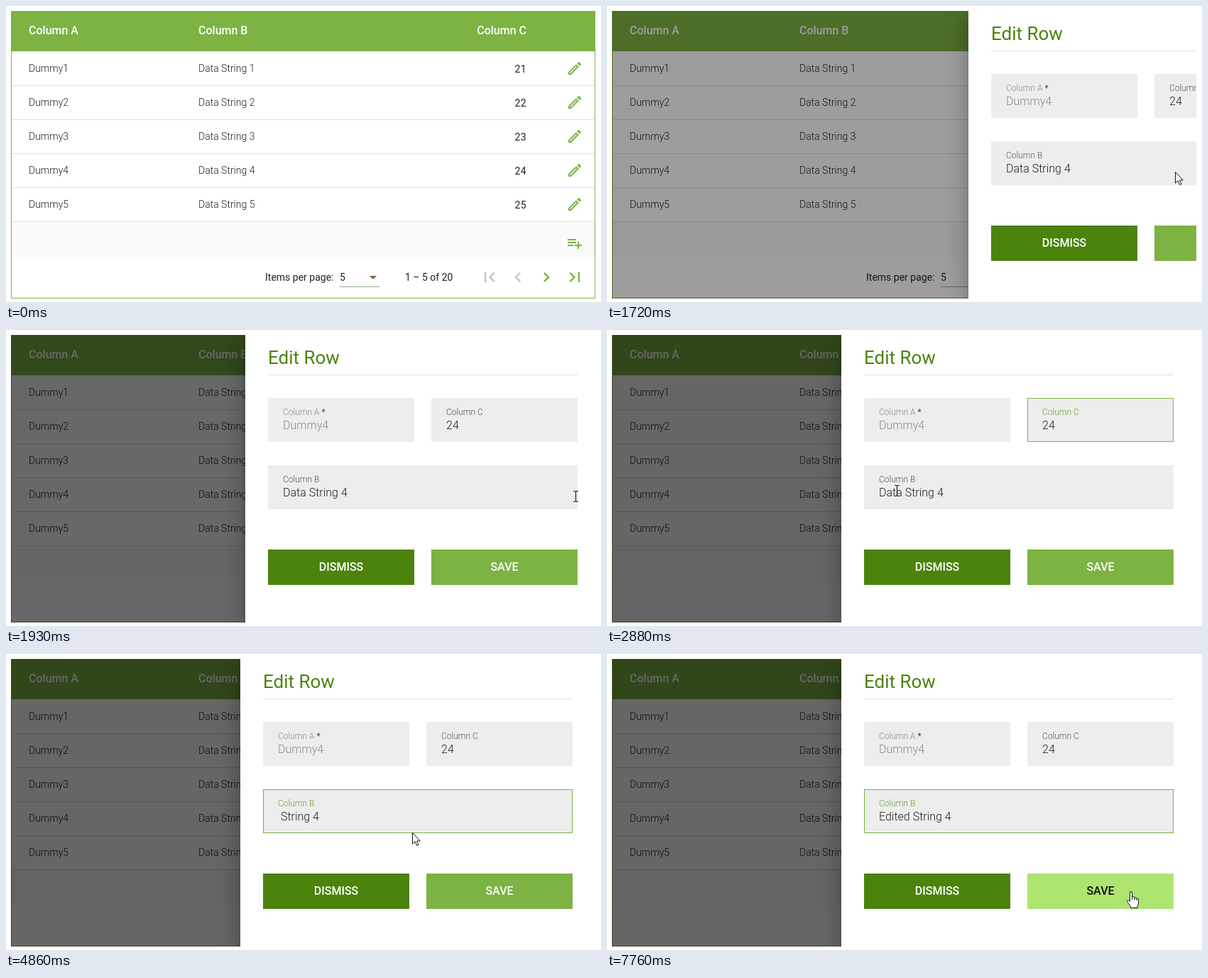
An HTML page that plays this animation: 838x418 px, repeating every 8000 ms.

```html
<!DOCTYPE html>
<html lang="en">
<head>
<meta charset="utf-8">
<title>Edit a table row</title>
<style>
html, body { margin: 0; width: 100%; height: 100%; overflow: hidden; background: #fff; }
body { position: relative; font: 300 14px/20px Roboto, sans-serif; color: rgba(0,0,0,.87); }
div, svg { position: absolute; box-sizing: border-box; }
.t { white-space: pre; height: 20px; }
#app { left: 7px; top: 7px; width: 823px; height: 406px; overflow: hidden; }
#view { left: -7px; top: -7px; width: 838px; height: 418px; }
.frame { left: 7px; top: 7px; width: 823px; height: 406px; border: 1px solid #7cb342; }
.head { left: 7px; top: 7px; width: 823px; height: 57px; background: #7cb342; }
.line { height: 1px; background: #e0e0e0; }
.h { color: #fff; font-weight: 500; font-size: 16px; }
.num { font-weight: 400; letter-spacing: .4px; }
.reg { font-weight: 400; }
#dim { inset: 0; background: #000; }
#panel { left: 0; top: 7px; width: 500px; height: 406px; background: #fff;
  box-shadow: 0 8px 10px -5px rgba(0,0,0,.2), 0 16px 24px 2px rgba(0,0,0,.14), 0 6px 30px 5px rgba(0,0,0,.12); }
.title { font-size: 26px; font-weight: 400; color: #4b830d; }
.field { height: 62px; background: #eceded; border: 1px solid transparent; }
.label { font-size: 12px; left: 20px; top: 9px; color: rgba(0,0,0,.65); }
.value { font-size: 16px; left: 20px; top: 28px; }
.off .label, .off .value { color: rgba(0,0,0,.42); }
.off b { font-weight: 400; color: rgba(0,0,0,.7); }
.focus { border-color: #7cb342; }
.focus .label { color: #689f38; }
.caret { position: relative; display: inline-block; width: 0; }
.caret::after { content: ""; position: absolute; left: 0; top: -15px; width: 1px; height: 18px; background: #111; }
.btn { top: 303px; width: 206px; height: 50px; font: 500 16px/49px Roboto, sans-serif; text-align: center; color: #fff; }
#tip { left: 712px; top: 219px; width: 55px; height: 27px; background: #717171; color: #fff;
  font: 500 9.6px/27px Inter, sans-serif; text-align: center; white-space: nowrap; }
#ripple { left: 782px; top: 216px; width: 37px; height: 37px; border-radius: 50%; background: rgba(0,0,0,.105); }
#mouse { left: 0; top: 0; width: 1px; height: 1px; }
#mouse svg { overflow: visible; left: 0; top: 0; }
</style>
</head>
<body>
<div id="app"><div id="view"></div></div>
<div id="mouse">
  <svg id="arrow" width="1" height="1"><path d="M.5 .5V16.2L4.2 12.8 6.7 18.5 9 17.5 6.6 12H11.4Z" fill="#fff" stroke="#111"/></svg>
  <svg id="beam" width="1" height="1"><path d="M-3 -7.5H-1L.5 -6.5 2 -7.5H4M.5 -6.5V6.5M-3 7.5H-1L.5 6.5 2 7.5H4" fill="none" stroke="#222" stroke-width="1.2"/></svg>
  <svg id="hand" width="1" height="1"><path d="M-1.5 12V2Q-1.5 .5 0 .5T1.6 2V8Q4.4 6.8 5 9Q7.4 8 8 10.2Q10.5 9.6 10.5 12V17Q10.5 19 9 21V23.5H-.5V21.5L-4.8 15.5Q-6.5 13 -4.6 12.4Q-3.4 12 -1.5 14.5Z" fill="#fff" stroke="#111"/><path d="M1.6 8V12M5 9V12.5M8 10.2V13" stroke="#111"/></svg>
</div>
<script>
const $ = id => document.getElementById(id);
const LOOP = 8000;
const GREEN = '#7cb342';

const box = (cls, x, y, w, h, extra = '') =>
  `<div class="${cls}" style="left:${x}px;top:${y}px;width:${w}px;height:${h}px;${extra}"></div>`;
const text = (x, mid, str, cls = '') =>
  `<div class="t ${cls}" style="left:${x}px;top:${mid - 10}px">${str}</div>`;
const textEnd = (right, mid, str, cls = '') =>
  `<div class="t ${cls}" style="right:${838 - right}px;top:${mid - 10}px">${str}</div>`;
const icon = (cx, cy, size, d, fill = GREEN) =>
  `<svg style="left:${cx - size / 2}px;top:${cy - size / 2}px" width="${size}" height="${size}" viewBox="0 0 24 24"><path fill="${fill}" d="${d}"/></svg>`;

const PENCIL = 'M14.06 9.02l.92.92L5.92 19H5v-.92l9.06-9.06M17.66 3c-.25 0-.51.1-.7.29l-1.83 1.83 3.75 3.75 1.83-1.83c.39-.39.39-1.02 0-1.41l-2.34-2.34c-.2-.2-.45-.29-.71-.29zm-3.6 3.19L3 17.25V21h3.75L17.81 9.94l-3.75-3.75z';
const ADD = 'M14 10H2v2h12v-2zm0-4H2v2h12V6zm4 8v-4h-2v4h-4v2h4v4h2v-4h4v-2h-4zM2 16h8v-2H2v2z';
const PAGES = [
  'M18.41 16.59L13.82 12l4.59-4.59L17 6l-6 6 6 6zM6 6h2v12H6z',
  'M15.41 7.41L14 6l-6 6 6 6 1.41-1.41L10.83 12z',
  'M10 6L8.59 7.41 13.17 12l-4.58 4.59L10 18l6-6z',
  'M5.59 7.41L10.18 12l-4.59 4.59L7 18l6-6-6-6zM16 6h2v12h-2z'
];

function table() {
  let s = box('', 8, 305, 821, 50, 'background:#fafafa') + '<div class="frame"></div><div class="head"></div>' +
    text(32, 35, 'Column A', 'h') + text(271, 35, 'Column B', 'h') + textEnd(733, 35, 'Column C', 'h');
  for (let i = 1; i <= 5; i++) {
    const y = 40 + 48 * i;
    s += text(32, y, 'Dummy' + i) + text(271, y, 'Data String ' + i) + textEnd(733, y + 1, 20 + i, 'num') +
      icon(801, y, 24, PENCIL) + box('line', 8, y + 24, 821, 1);
  }
  s += icon(801, 335, 24, ADD) + text(365, 383, 'Items per page:', 'reg') + text(470, 383, '5', 'reg') +
    box('', 470, 396, 56, 1, 'background:#8fae8c') +
    '<svg style="left:512px;top:381px" width="10" height="5"><path d="M0 0H10L5 5Z" fill="#7b6a35"/></svg>' +
    text(562, 383, '1 – 5 of 20', 'reg');
  PAGES.forEach((d, i) => s += icon(681 + 40 * i, 383, 28, d, i < 2 ? '#bccbb9' : GREEN));
  return s;
}

const field = (id, x, y, w, label, value, cls = '') =>
  `<div id="${id}" class="field ${cls}" style="left:${x}px;top:${y}px;width:${w}px">
  <div class="t label">${label}</div><div class="t value">${value}</div></div>`;

const form = text(32, 32, 'Edit Row', 'title') + box('line', 32, 56, 436, 1) +
  field('fa', 32, 89, 206, 'Column A <b>*</b>', 'Dummy4', 'off') +
  field('fc', 262, 89, 206, 'Column C', '<span class="caret" id="caretC"></span>24') +
  field('fb', 32, 184, 436, 'Column B', '<span id="pre"></span><span class="caret" id="caretB"></span><span id="post"></span>') +
  '<div class="btn" style="left:32px;background:#4b830d">DISMISS</div>' +
  '<div class="btn" id="save" style="left:262px">SAVE</div>';

$('view').innerHTML = table() +
  '<div id="tip">Edit Row</div><div id="ripple"></div><div id="dim"></div>' +
  `<div id="panel">${form}</div>`;

// time, x, y of the pointer
const PATH = [
  [120, 838, 240], [300, 800, 234], [2240, 800, 234], [2320, 785, 241], [2480, 700, 238],
  [2880, 408, 227], [3040, 387, 229], [3090, 387, 229], [3330, 382, 231],
  [3500, 572, 252], [6890, 572, 252], [7260, 738, 335]
];
const SHAPES = [[0, 'none'], [120, 'arrow'], [1770, 'beam'], [1985, 'arrow'], [2340, 'beam'], [3480, 'arrow'], [7140, 'hand']];
// text before and after the caret in Column B
const EDITS = [
  [0, '', 'Data String 4'], [4130, '', 'ata String 4'], [4210, '', 'ta String 4'], [4290, '', 'a String 4'],
  [4780, '', ' String 4'], [5340, 'E', ' String 4'], [5590, 'Ed', ' String 4'], [5670, 'Edi', ' String 4'],
  [5920, 'Edit', ' String 4'], [6000, 'Edite', ' String 4'], [6170, 'Edited', ' String 4']
];
const BLINK_B = [[0, 0], [3330, 1], [3830, 0], [4370, 1], [4860, 0], [5340, 1], [6670, 0], [7260, 1], [7760, 0]];
const BLINK_C = [[0, 0], [2040, 1], [2540, 0], [3040, 1], [3330, 0]];
const FOCUS = [[0, ''], [2040, 'fc'], [3330, 'fb']];

const step = (rows, t) => rows.filter(r => r[0] <= t).pop();
const clamp = v => Math.max(0, Math.min(1, v));
const show = (id, on) => $(id).style.visibility = on ? 'visible' : 'hidden';

function pointer(t) {
  let i = PATH.findIndex(p => p[0] > t);
  if (i === 0) return PATH[0].slice(1);
  if (i < 0) return PATH[PATH.length - 1].slice(1);
  const [a, b] = [PATH[i - 1], PATH[i]], k = (t - a[0]) / (b[0] - a[0]);
  return [1, 2].map(n => Math.round(a[n] + (b[n] - a[n]) * k));
}

// cubic-bezier(.25, .8, .25, 1)
function ease(x) {
  let lo = 0, hi = 1, u = x;
  for (let i = 0; i < 24; i++) {
    u = (lo + hi) / 2;
    if (.75 * u * (1 - u) + u ** 3 < x) lo = u; else hi = u;
  }
  return 2.4 * u * (1 - u) ** 2 + 3 * u * u * (1 - u) + u ** 3;
}

function draw(t) {
  const [x, y] = pointer(t), shape = step(SHAPES, t)[1];
  $('mouse').style.transform = `translate(${x}px,${y}px)`;
  $('beam').style.transform = t < 2240 ? 'translate(2px,1px)' : 'none';
  for (const id of ['arrow', 'beam', 'hand']) show(id, id === shape);

  const grow = clamp((t - 300) / 200);
  show('tip', grow > 0);
  $('tip').style.opacity = grow;
  $('tip').style.transform = `scale(${1 - (1 - grow) ** 2})`;
  const wave = clamp((t - 1490) / 150);
  show('ripple', wave > 0);
  $('ripple').style.transform = `scale(${1 - (1 - wave) ** 2})`;

  const slide = t < 1690 ? 0 : ease(clamp((t - 1631) / 416));
  show('panel', slide > 0);
  $('panel').style.transform = `translateX(${Math.round(830 - 500 * slide)}px)`;
  $('dim').style.opacity = .6 * slide;

  const focus = step(FOCUS, t)[1];
  for (const id of ['fb', 'fc']) $(id).classList.toggle('focus', id === focus);
  const [, pre, post] = step(EDITS, t);
  $('pre').textContent = pre;
  $('post').textContent = post;
  $('caretB').style.opacity = step(BLINK_B, t)[1];
  $('caretC').style.opacity = step(BLINK_C, t)[1];

  const over = shape === 'hand';
  $('save').style.background = over ? '#aee571' : GREEN;
  $('save').style.color = over ? '#111' : '#fff';
}

const start = performance.now();
function tick() {
  draw((performance.now() - start) % LOOP);
  requestAnimationFrame(tick);
}
tick();
</script>
</body>
</html>
```
